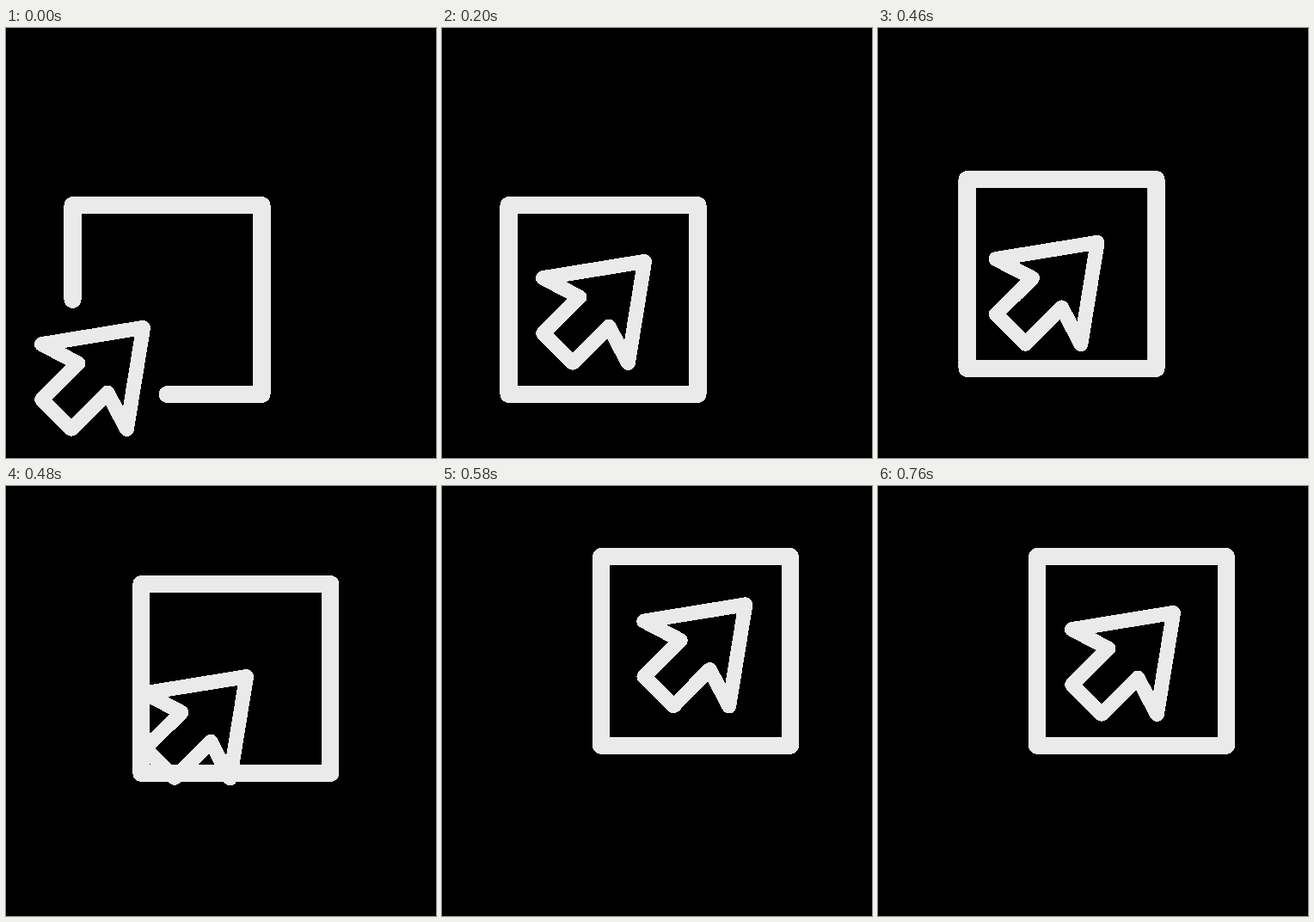
An HTML page that plays this animation: 500x500 px, repeating every 1.2 s.

```html
<!DOCTYPE html>
<html lang="en">
<head>
<meta charset="utf-8">
<title>Arrow and box</title>
<style>
  html, body { margin: 0; width: 100%; height: 100%; overflow: hidden; background: #000; }
  svg { display: block; width: 100%; height: 100%; }
  path { fill: none; stroke: #eaeaea; stroke-linecap: round; stroke-linejoin: round; }
</style>
</head>
<body>
<svg viewBox="0 0 500 500">
  <!-- Hard edges: each pixel is either fully on or off. -->
  <filter id="hard" filterUnits="userSpaceOnUse" x="0" y="0" width="500" height="500"
          color-interpolation-filters="sRGB">
    <feComponentTransfer><feFuncA type="linear" slope="100" intercept="-45"/></feComponentTransfer>
  </filter>
  <g filter="url(#hard)">
    <path id="box" stroke-width="20"/>
    <path id="arrow" stroke-width="16.8"
          d="M159.6 348.4L41.4 367.6L84 390L41.6 432L76 466.4L118 424L140.4 466.6Z"/>
  </g>
</svg>
<script>
const LOOP = 1200, STEP = 20;
const box = document.getElementById('box');
const arrow = document.getElementById('arrow');

// Cubic Bezier easing with flat ends; x1 and x2 set the influence.
function bezier(x1, x2) {
  return u => {
    if (u <= 0) return 0;
    if (u >= 1) return 1;
    let lo = 0, hi = 1, s = 0.5;
    for (let i = 0; i < 24; i++) {
      s = (lo + hi) / 2;
      const r = 1 - s;
      const x = 3 * s * r * r * x1 + 3 * s * s * r * x2 + s * s * s;
      if (x < u) lo = s; else hi = s;
    }
    return s * s * (3 - 2 * s);
  };
}

const easeEnter = bezier(0.65, 0.35);
const easeBox = bezier(0.81, 0.28);
const easeThrow = bezier(0.9, 0.74);
const easeSettle = u => 1 - (1 - u) * (1 - u);

const span = (t, from, to) => Math.min(1, Math.max(0, (t - from) / (to - from)));
const move = (el, x, y) => el.setAttribute('transform', `translate(${x} ${y})`);

function draw(t) {
  const enter = easeEnter(span(t, 100, 200));
  const slide = easeBox(span(t, 400, 533));
  const toss = easeThrow(span(t, 400, 520));
  const settle = easeSettle(span(t, 520, 760));

  // The open corner closes while the arrow enters.
  box.setAttribute('d',
    `M77.5 ${316 + 110 * enter}V206H297.5V426H${187.5 - 110 * enter}`);
  move(box, 107.5 * slide, -124 * slide);
  move(arrow,
    76 * enter + 124.5 * toss - 16.5 * settle,
    -77 * enter - 141 * toss + 17 * settle);
}

const start = performance.now();
function tick() {
  const t = (performance.now() - start) % LOOP;
  draw(Math.floor(t / STEP) * STEP);
  requestAnimationFrame(tick);
}
draw(0);
requestAnimationFrame(tick);
</script>
</body>
</html>
```
